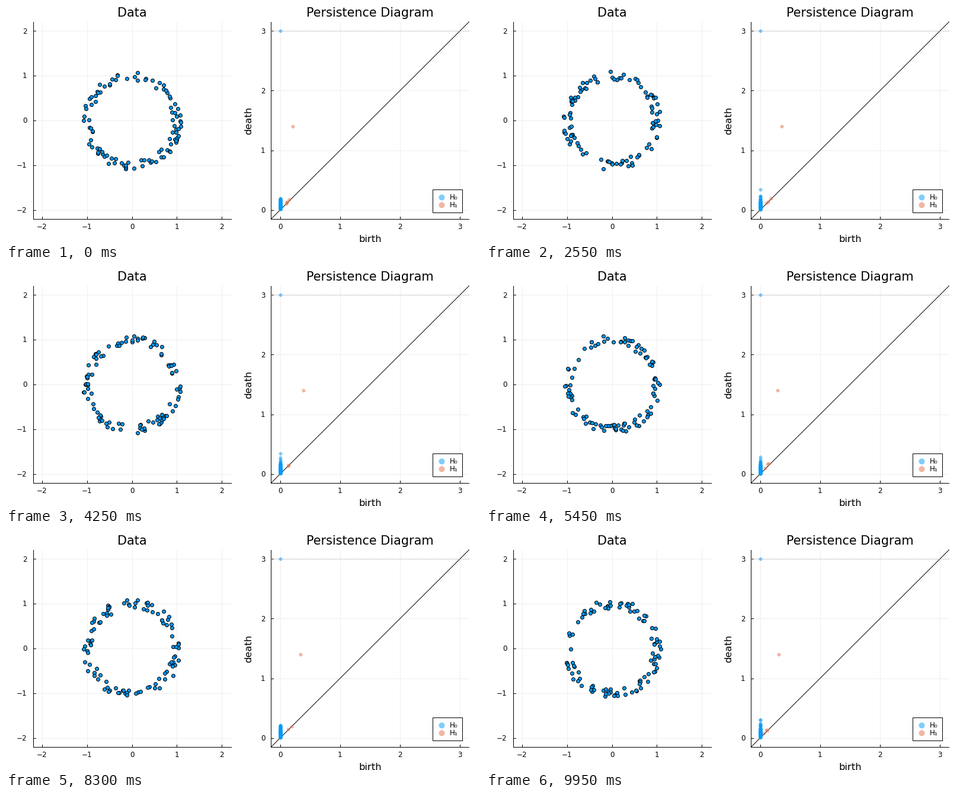
Write a matplotlib script that moves like this. It is 800x400 px and loops after 10000 ms.

```python
import numpy as np
import matplotlib.pyplot as plt
from matplotlib.animation import FuncAnimation
from matplotlib.patches import Rectangle

W, H, DPI = 800, 400, 100
FRAMES, INTERVAL = 200, 50
POINTS = 100
TOP, BOTTOM = 27, 361
BLUE, ORANGE, GRID = "#009afa", "#e26f46", "#eeeeee"
PX = 72 / DPI  # one pixel in points

plt.rcParams["font.family"] = "DejaVu Sans"
fig = plt.figure(figsize=(W / DPI, H / DPI), dpi=DPI, facecolor="white")
ax = fig.add_axes([0, 0, 1, 1])
ax.set_xlim(0, W)
ax.set_ylim(H, 0)
ax.axis("off")


def line(x, y, color="black", width=1, **kw):
    ax.plot(x, y, color=color, lw=width * PX, **kw)


def label(x, y, text, size, ha="center", **kw):
    ax.text(x, y, text, fontsize=size * PX, ha=ha, va="baseline", **kw)


def dots(color, size, edge="none", alpha=None):
    return ax.plot([], [], "o", color=color, ms=size * PX, mec=edge,
                   mew=PX if edge != "none" else 0, alpha=alpha, zorder=4)[0]


class Panel:
    """Square plot area that maps data units to stage pixels."""

    def __init__(self, left, low, high, ticks, title):
        self.left, self.low = left, low
        self.right = left + BOTTOM - TOP
        self.scale = (BOTTOM - TOP) / (high - low)
        for t in ticks:
            self.tick(t)
        line([left, left], [TOP, BOTTOM], zorder=2)
        line([left, self.right], [BOTTOM, BOTTOM], zorder=2)
        label(self.center, 18.3, title, 20.8)

    @property
    def center(self):
        return (self.left + self.right) / 2

    def x(self, v):
        return self.left + (np.asarray(v) - self.low) * self.scale

    def y(self, v):
        return BOTTOM - (np.asarray(v) - self.low) * self.scale

    def tick(self, t):
        x, y = self.x(t), self.y(t)
        name = str(t).replace("-", "\u2212")
        line([x, x], [TOP, BOTTOM], GRID, zorder=1)
        line([self.left, self.right], [y, y], GRID, zorder=1)
        line([x, x], [BOTTOM, BOTTOM - 4], zorder=2)
        line([self.left, self.left + 4], [y, y], zorder=2)
        label(x, 378.3, name, 11.9)
        label(self.left - 10, y + 4.4, name, 11.9, ha="right")

    def place(self, artist, xs, ys):
        artist.set_data(self.x(xs), self.y(ys))


data = Panel(45.5, -2.2, 2.2, range(-2, 3), "Data")
diagram = Panel(447.4, -0.15, 3.15, range(4), "Persistence Diagram")

label(diagram.center, 400, "birth", 16.4)
label(414.5, 194, "death", 16.4, rotation=90, rotation_mode="anchor")
line([diagram.left, diagram.right], [BOTTOM, TOP], zorder=3)
line([diagram.left, diagram.right], [diagram.y(3)] * 2, "#8c8c8c",
     ls=(0, (1, 2)), dash_capstyle="butt", zorder=3)

ax.add_patch(Rectangle((719.5, 310.5), 50, 39, fc="white", ec="black",
                       lw=PX, zorder=5))
for y, color, name in ((324, BLUE, "H\u2080"), (337, ORANGE, "H\u2081")):
    ax.plot([734.5], [y], "o", color=color, ms=10 * PX, mew=0, alpha=0.5,
            zorder=6)
    label(748.5, y + 4.3, name, 11.9, ha="left", zorder=6)

cloud = dots(BLUE, 6, edge="black")
parts = dots(BLUE, 6, alpha=0.5)
loops = dots(ORANGE, 6, alpha=0.5)


def merge_scales(dist, turn):
    """Scales at which components join, and at which a chain rounds the ring."""
    n = len(dist)
    comp, lift = np.arange(n), np.zeros(n)
    deaths, birth = [], None
    rows, cols = np.triu_indices(n, 1)
    for k in np.argsort(dist[rows, cols]):
        i, j = rows[k], cols[k]
        gap = lift[i] + turn[i, j] - lift[j]
        if comp[i] != comp[j]:
            side = comp == comp[j]
            lift[side] += gap
            comp[side] = comp[i]
            deaths.append(dist[i, j])
        elif birth is None and abs(gap) > 1:
            birth = dist[i, j]
        if birth is not None and len(deaths) == n - 1:
            break
    return deaths, birth


def fill_scale(dist, turn):
    """Smallest scale at which some triangle spans the centre."""
    low, high = 1.4, 2.2
    for _ in range(10):
        mid = (low + high) / 2
        step = ((dist <= mid) & (turn > 0)).astype(float)
        if np.sum((step @ step) * step.T) > 0:
            high = mid
        else:
            low = mid
    return high


def update(frame):
    rng = np.random.default_rng(frame)
    angle = rng.uniform(0, 2 * np.pi, POINTS)
    z = rng.uniform(0.9, 1.1, POINTS) * np.exp(1j * angle)
    dist = np.abs(z[:, None] - z)
    turn = np.angle(z / z[:, None])

    deaths, birth = merge_scales(dist, turn)
    # short-lived loops hug the diagonal
    count = rng.integers(2, 5)
    born = np.clip(rng.normal(0.13, 0.035, count), 0.05, 0.24)
    died = born + 0.002 + rng.exponential(0.012, count)

    data.place(cloud, z.real, z.imag)
    diagram.place(parts, np.zeros(POINTS), deaths + [3])
    diagram.place(loops, np.append(born, birth),
                  np.append(died, fill_scale(dist, turn)))
    return cloud, parts, loops


anim = FuncAnimation(fig, update, frames=FRAMES, interval=INTERVAL,
                     init_func=lambda: update(0), repeat=True, repeat_delay=0)
plt.show()
```
